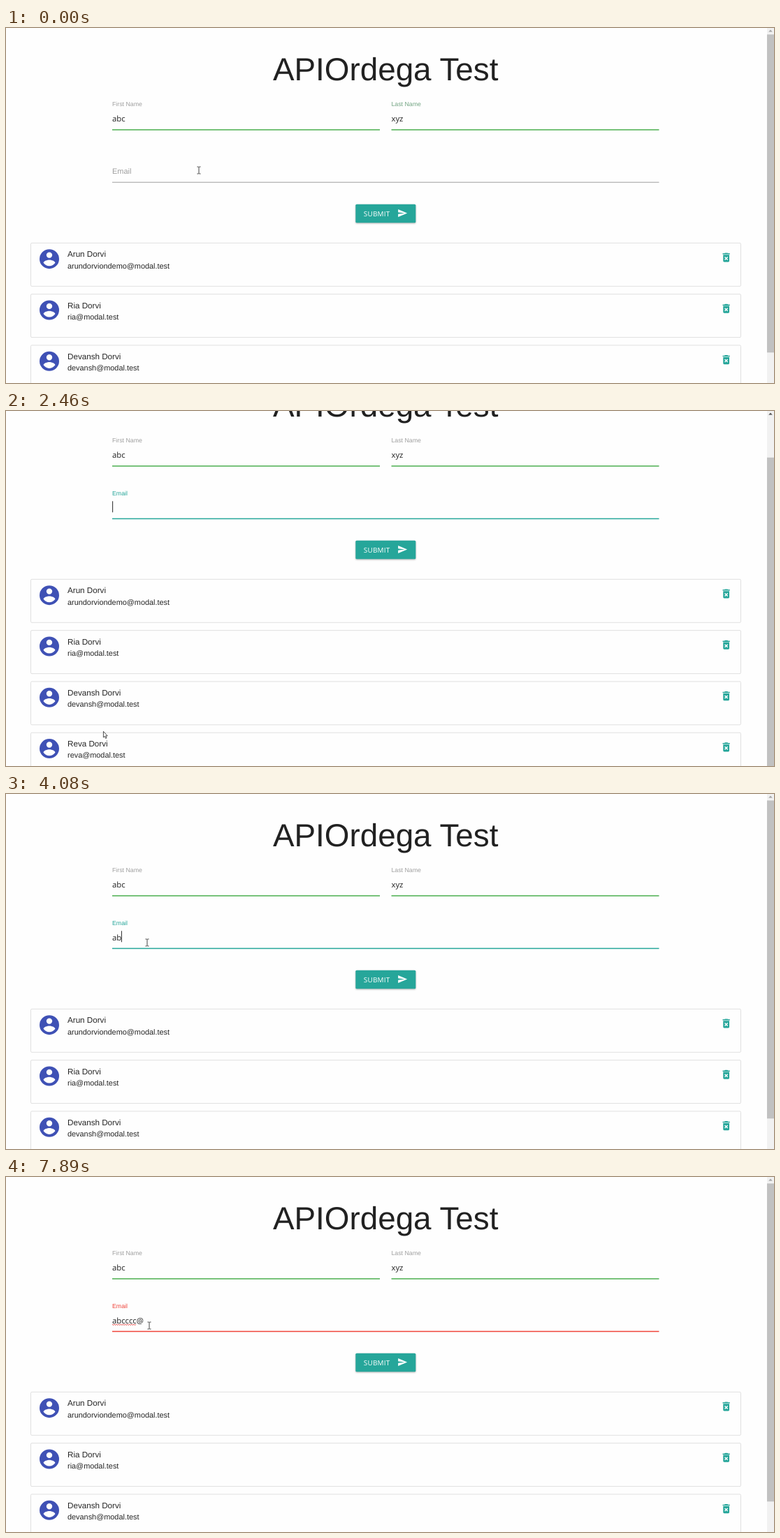
Write an HTML page that moves like this. It is 1099 by 509 pixels and loops after 8000 ms.

```html
<!DOCTYPE html>
<html lang="en">
<head>
<meta charset="utf-8">
<title>Contact form</title>
<style>
  html, body { margin: 0; width: 100%; height: 100%; overflow: hidden; background: #fefefe; }
  svg { display: block; width: 100vw; height: 100vh; }
  text { font-family: "Liberation Sans", Arial, sans-serif; fill: #262626; white-space: pre; text-rendering: geometricPrecision; }
  .title { font-size: 45.8px; fill: #212121; }
  .label { font-size: 8.75px; fill: #9e9e9e; }
  .input { font: 11.3px "Open Sans", "Noto Sans", sans-serif; fill: #212121; }
  .name { font-size: 11.65px; }
  .mail { font-size: 10.9px; }
  .submit { font: 9.9px "Open Sans", "Noto Sans", sans-serif; letter-spacing: .25px; fill: #fff; }
  .button { fill: #26a69a; filter: drop-shadow(0 1.3px 1px rgba(0, 0, 0, .3)); }
  .card { fill: none; stroke: #e0e0e0; }
</style>
</head>
<body>
<svg viewBox="0 0 1099 509">
  <g id="page">
    <text class="title" x="382" y="75">APIOrdega Test</text>

    <text class="label" x="152" y="112.2">First Name</text>
    <text class="input" x="152" y="134">abc</text>
    <rect x="152" y="145.2" width="383" height="1.5" fill="#4caf50"/>

    <text class="label" id="lastLabel" x="551.5" y="112.2">Last Name</text>
    <text class="input" x="551.5" y="134">xyz</text>
    <rect x="551.5" y="145.2" width="383" height="1.5" fill="#4caf50"/>

    <text class="label" id="mailLabel">Email</text>
    <text class="input" id="mailText" x="152" y="209.5"></text>
    <path id="squiggle" fill="none" stroke="#e53935" stroke-width=".9"/>
    <rect id="caret" y="196.3" width=".9" height="16" fill="#111"/>
    <rect id="mailLine" x="152" y="220.7" width="782.5"/>

    <rect class="button" x="500.3" y="252.8" width="86" height="26.4" rx="1.5"/>
    <text class="submit" x="511.8" y="269.8">SUBMIT</text>
    <path transform="translate(559.9 258.1) scale(.62)" fill="#fff" d="M2 21L23 12 2 3V10l15 2-15 2z"/>

    <g id="cards"></g>
  </g>

  <rect x="1089" width="10" height="509" fill="#f1f1f1"/>
  <path id="upArrow" d="M1091.2 5.4L1094 2.4 1096.8 5.4Z"/>
  <rect id="thumb" x="1089" width="10" height="456" fill="#c1c1c1"/>

  <g id="cursor">
    <path id="arrow" fill="#fff" stroke="#222" stroke-width=".8" d="M.4.4V9L2.3 7.3 3.6 10.4 5 9.8 3.7 6.8H6.2Z"/>
    <path id="beam" fill="none" stroke="#444" d="M-2.5-5H-.5L0-4.5.5-5H2.5M0-4.5V4.5M-2.5 5H-.5L0 4.5.5 5H2.5"/>
  </g>
</svg>
<script>
const LOOP = 8000, BLINK = 530, MAX_SCROLL = 67;
const FOCUS = 30, BLUR = 5450, REFOCUS = 6650;
const GRAY = [158, 158, 158], TEAL = [38, 166, 154], RED = [239, 68, 58];

const $ = id => document.getElementById(id);
const set = (id, attrs) => {
  for (const k in attrs) $(id).setAttribute(k, attrs[k]);
};
const clamp = x => Math.min(1, Math.max(0, x));
const span = (t, from, to) => clamp((t - from) / (to - from));
const easeOut = x => 1 - (1 - x) ** 3;
const easeInOut = x => x < .5 ? 4 * x ** 3 : 1 - 4 * (1 - x) ** 3;
const smooth = x => x * x * (3 - 2 * x);
const mix = (a, b, k) => a.map((v, i) => v + (b[i] - v) * k);
const rgb = c => `rgb(${c.map(Math.round)})`;

// Contact cards
const AVATAR = "M12 2a10 10 0 1 0 0 20 10 10 0 0 0 0-20zm0 3a3 3 0 1 1 0 6 3 3 0 0 1 0-6zm0 14.2c-2.5 0-4.71-1.28-6-3.22.03-1.99 4-3.08 6-3.08s5.97 1.09 6 3.08c-1.29 1.94-3.5 3.22-6 3.22z";
const TRASH = "M6 19c0 1.1.9 2 2 2h8c1.1 0 2-.9 2-2V7H6zM8.46 11.88l1.41-1.41L12 12.59l2.12-2.12 1.41 1.41L13.41 14l2.12 2.12-1.41 1.41L12 15.41l-2.12 2.12-1.41-1.41L10.59 14zM15.5 4l-1-1h-5l-1 1H5v2h14V4z";
const people = [
  ["Arun Dorvi", "arundorviondemo"],
  ["Ria Dorvi", "ria"],
  ["Devansh Dorvi", "devansh"],
  ["Reva Dorvi", "reva"]
];
$("cards").innerHTML = people.map(([name, user], i) => `
  <g transform="translate(0 ${308 + i * 73.3})">
    <rect class="card" x="35.5" y=".3" width="1016" height="62" rx="1.5"/>
    <path transform="translate(45.2 6.4) scale(1.4)" fill="#3f51b5" fill-rule="evenodd" d="${AVATAR}"/>
    <text class="name" x="88" y="20.3">${name}</text>
    <text class="mail" x="88" y="36.6">${user}@modal.test</text>
    <path transform="translate(1021.9 12.2) scale(.73)" fill="#26a69a" fill-rule="evenodd" d="${TRASH}"/>
  </g>`).join("");

let wave = "M152 211.2";
for (let i = 0; i < 11; i++) wave += "l1.55 1.2 1.55-1.2";
set("squiggle", { d: wave });

// Email field: time of each key, text after it, caret position
const keys = [
  [FOCUS, "", 152.2], [3650, "a", 158.4], [4080, "ab", 164.9], [4250, "abc", 170.5],
  [4760, "abcc", 175.9], [4940, "abccc", 181.2], [5150, "abcccc", 186.5],
  [REFOCUS, "abcccc", 186.5], [7360, "abcccc@", 196.8]
];

// Pointer: time, x, y
const path = [
  [0, 276, 204], [710, 276, 204], [1000, 430, 296], [1200, 486, 328], [1290, 486, 328],
  [1450, 467, 340], [1550, 467, 340], [1800, 270, 420], [2050, 54, 428], [2290, 132, 437],
  [2380, 132, 437], [2450, 139, 459], [2500, 139, 459], [2800, 292, 289], [2880, 292, 289],
  [3170, 262, 283], [3200, 262, 283], [3320, 202, 213], [4090, 202, 213], [4220, 226, 246],
  [4330, 235, 219], [5140, 235, 219], [5270, 237, 238], [5620, 237, 238], [5920, 141, 228],
  [6240, 157, 223], [6270, 157, 223], [6620, 205, 213], [LOOP, 205, 213]
];

function pointerAt(t) {
  const i = Math.max(1, path.findIndex(p => p[0] > t));
  const [t0, x0, y0] = path[i - 1], [t1, x1, y1] = path[i];
  const k = smooth(span(t, t0, t1));
  return [x0 + (x1 - x0) * k, y0 + (y1 - y0) * k];
}

function scrollAt(t) {
  return MAX_SCROLL * (easeInOut(span(t, 960, 1387)) - easeInOut(span(t, 2610, 2954)));
}

function drawEmail(t) {
  const key = keys.filter(k => k[0] <= t).pop();
  const focused = t >= FOCUS && t < BLUR || t >= REFOCUS;
  const caretOn = focused && Math.floor((t - key[0]) / BLINK) % 2 === 0;
  $("mailText").textContent = key ? key[1] : "";
  set("caret", { x: key ? key[2] : 152.2, visibility: caretOn ? "visible" : "hidden" });
  set("squiggle", { visibility: t >= 7360 ? "visible" : "hidden" });

  const up = easeOut(span(t, 20, 230));
  let label = mix(GRAY, TEAL, up);
  label = mix(label, GRAY, span(t, BLUR - 20, 5560));
  label = mix(label, RED, span(t, REFOCUS, 6820));
  set("mailLabel", {
    transform: `translate(152 ${208.5 - 20.8 * up}) scale(${1.25 - .25 * up})`,
    style: `fill:${rgb(label)}`
  });
  const line = mix(mix(GRAY, TEAL, up), RED, span(t, 5420, 5600));
  set("mailLine", { fill: rgb(line), height: 1 + .5 * up });
  set("lastLabel", { style: `fill:${rgb(mix([112, 163, 128], GRAY, span(t, 20, 180)))}` });
}

function drawPointer(t, scroll) {
  const [x, y] = pointerAt(t), py = y + scroll;
  const overField = x > 152 && x < 935 && (py > 113 && py < 146 || py > 188 && py < 222);
  const hidden = t >= 4520 && t < 5150;
  set("cursor", { transform: `translate(${x} ${y})`, visibility: hidden ? "hidden" : "visible" });
  set("arrow", { display: overField ? "none" : "inline" });
  set("beam", { display: overField ? "inline" : "none" });
}

function draw(t) {
  const scroll = scrollAt(t);
  set("page", { transform: `translate(0 ${-scroll})` });
  set("thumb", { y: 9.3 + scroll * .857 });
  set("upArrow", { fill: scroll > .3 ? "#505050" : "#a3a3a3" });
  drawEmail(t);
  drawPointer(t, scroll);
}

const start = performance.now();
function tick(now) {
  draw(Math.max(0, now - start) % LOOP);
  requestAnimationFrame(tick);
}
draw(0);
requestAnimationFrame(tick);
</script>
</body>
</html>
```
